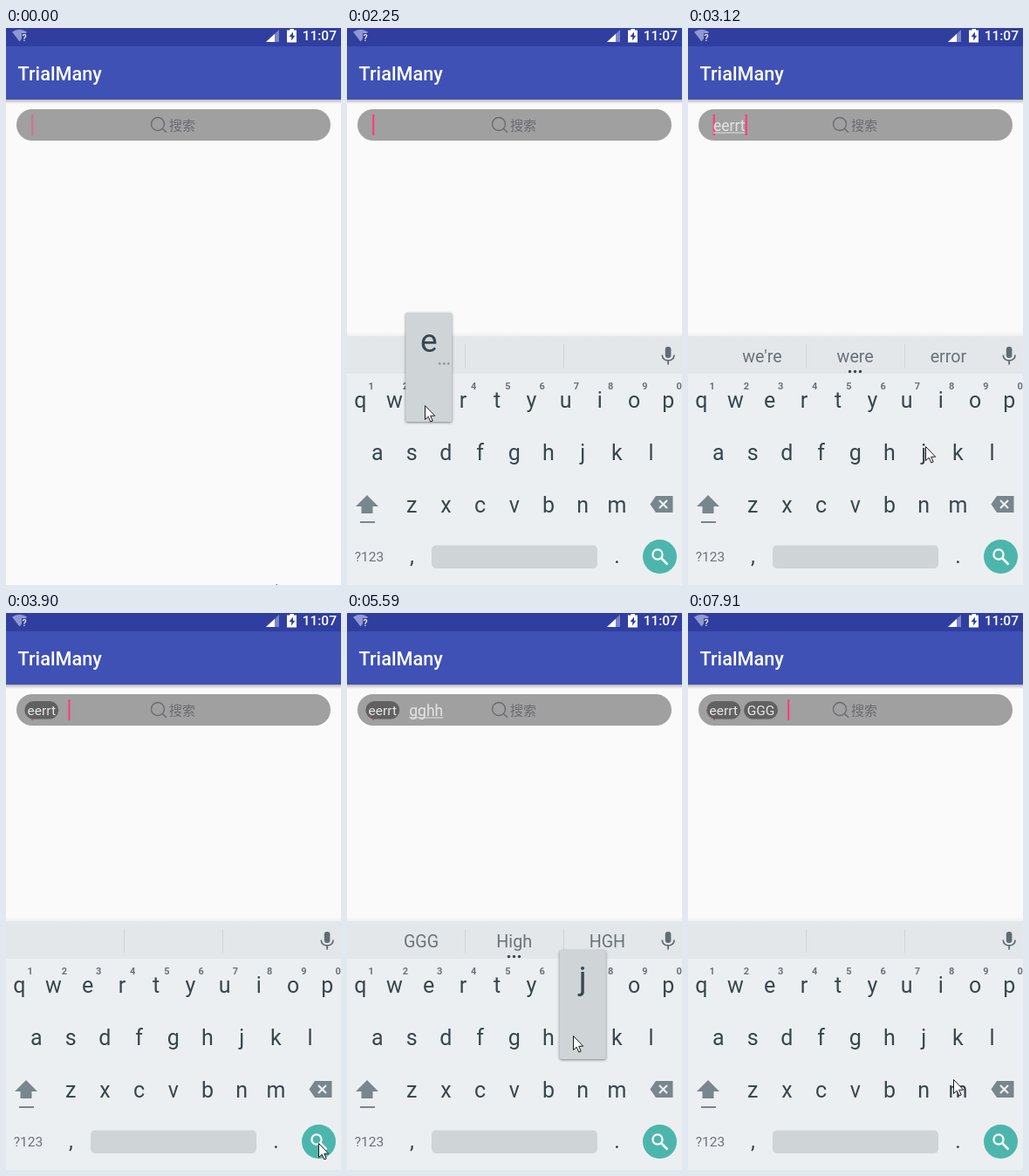
Recreate the animation shown at these times as an HTML page. Size 384 px wide and 638 px high, loop 7990 ms.

```html
<!DOCTYPE html>
<html>
<head>
<meta charset="utf-8">
<style>
html, body { margin: 0; width: 100%; height: 100%; overflow: hidden; background: #fafafa; }
svg { display: block; width: 100%; height: 100%; font-family: Roboto, "Noto Sans CJK SC", "Noto Sans CJK", sans-serif; }
.popup { filter: drop-shadow(0 1.5px 1.5px #0007); }
</style>
</head>
<body>
<svg id="stage" viewBox="0 0 384 638"></svg>
<script>
// The screen refreshes on even ticks; all times below are in ticks.
const LOOP = 7990, TICK_COUNT = 103, BLINK = 6.5;
const INK = '#37474f', SOFT = '#78868d', LABEL = '#69737a', KEY = '#cfd4d7', PINK = '#ff4081', HINT = '#6c6b72';
const FONT = 17.5;

const SEARCH = [358, 607];
// Pointer moves: start, end, destination
const MOVES = [
  [0, 7, [62, 108]], [19, 24, [83, 426]], [27, 29, [89, 432]],
  [32, 38, [170, 433]], [38, 40, [272, 479]], [40, 46, SEARCH],
  [55, 62, [196, 484]], [66, 72, [259, 484]], [73, 80, [79, 372]],
  [82, 86, [246, 372]], [88, 94, [370, 560]], [94, 98, SEARCH], [98, 102, [304, 534]]];
const TAPS = { 29: 'e', 31: 'e', 34: 'r', 36: 'r', 37: 't', 63: 'g', 65: 'g', 68: 'h', 70: 'h', 72: 'j' };
const OPEN = 10, FIRST_CHIP = 49, PICK = 81, SECOND_CHIP = 99;
const SUGGESTIONS = {
  e: ['we', 'eh', 'en'], ee: ['see', 'were', 'we'], eer: ['were', 'eerie', 'beer'],
  eerr: ['were', 'error', 'eerie'], eerrt: ["we're", 'were', 'error'],
  g: ['good', 'get', 'go'], gg: ['GG', 'egg', 'go'], ggh: ['GGG', 'High', 'ugh'],
  gghh: ['GGG', 'High', 'HGH'], gghhj: ['GGG', 'gghhj', 'Height'] };
const tapTicks = Object.keys(TAPS).map(Number);
// Moments that restart the caret's blinking
const WAKES = [-BLINK, 7, OPEN + 4, ...tapTicks.map(t => t + 1), FIRST_CHIP, PICK, SECOND_CHIP];

const ROWS = ['qwertyuiop', 'asdfghjkl', 'zxcvbnm'];
const keyX = (row, i) => 15.3 + (row / 2 + (row > 1 ? .5 : 0) + i) * 39.22;
const keyY = row => 434.5 + row * 60;

const pen = document.createElement('canvas').getContext('2d');
pen.font = `${FONT}px Roboto, sans-serif`;
const rect = (x, y, w, h, fill, r = 0, more = '') =>
  `<rect x="${x}" y="${y}" width="${w}" height="${h}" rx="${r}" fill="${fill}" ${more}/>`;
const path = (d, fill, more = '') => `<path d="${d}" fill="${fill}" ${more}/>`;
const line = (d, color, w) => path(d, 'none', `stroke="${color}" stroke-width="${w}"`);
const circle = (x, y, r, fill, more = '') => `<circle cx="${x}" cy="${y}" r="${r}" fill="${fill}" ${more}/>`;
const text = (s, x, y, size, fill, anchor = 'middle', weight = 400) =>
  `<text x="${x}" y="${y}" font-size="${size}" fill="${fill}" text-anchor="${anchor}" font-weight="${weight}">${s}</text>`;
const dots = (x, y, gap, r, fill) => [-1, 0, 1].map(i => circle(x + i * gap, y, r, fill)).join('');

const header =
  '<defs><linearGradient id="shade" x2="0" y2="1"><stop stop-color="#000" stop-opacity=".26"/>' +
  '<stop offset="1" stop-color="#000" stop-opacity="0"/></linearGradient></defs>' +
  rect(0, 0, 384, 638, '#fafafa') + rect(0, 82, 384, 5, 'url(#shade)') +
  rect(0, 0, 384, 82, '#3f51b5') + rect(0, 0, 384, 21, '#303f9f') +
  path('M7 4.5Q15.5 -1 24 4.5L15.5 15.5Z', '#8f98d0') +
  rect(18, 6, 7, 10, '#303f9f') + text('?', 21, 14.5, 10.5, '#fff', 'middle', 500) +
  path('M313 2V16H298Z', '#7a84c4') + path('M308 6.7V16H298Z', '#fff') +
  path('M325.5 1H330V2.5H333V16.5H322V2.5H325.5Z', '#fff') +
  path('M329 4.5L324.5 10H327.2V14.5L331.3 8.7H329Z', '#303f9f') +
  text('11:07', 379, 14, 15.5, '#fff', 'end', 500) +
  text('TrialMany', 13.5, 60, 21.7, '#fff', 'start', 500);

const field = rect(12, 93, 360, 36, '#a0a0a0', 18) +
  circle(174, 110, 7.5, 'none', `stroke="${HINT}" stroke-width="1.4"`) +
  line('M179.5 115.5L184 119.5', HINT, 1.6) + text('搜索', 187, 116.5, 15, HINT, 'start');

const letters = ROWS.map((row, r) => [...row].map((c, i) =>
  text(c, keyX(r, i), keyY(r), 25, INK) +
  (r ? '' : text((i + 1) % 10, keyX(r, i) + 12.3, 413.5, 11, LABEL, 'middle', 700))).join('')).join('');

const board =
  rect(0, 348, 384, 6, 'url(#shade)', 0, 'opacity=".2" transform="matrix(1 0 0 -1 0 702)"') +
  rect(0, 353, 384, 285, '#eceff1') + rect(0, 353, 384, 43, '#e3e7ea') +
  rect(135, 362, 1, 27, KEY) + rect(248, 362, 1, 27, KEY) +
  rect(364.8, 365, 6.6, 13, '#5f6c73', 3.3) +
  line('M361.3 374.5C361.3 383 375 383 375 374.5M368.1 381V385.5', '#5f6c73', 1.8) +
  letters +
  path('M23 535L36 548H29.5V556H16.5V548H10Z', SOFT) + rect(15, 565, 17, 2, SOFT) +
  path('M347.5 545.5L354 536H373.5V555H354Z', SOFT) +
  line('M358 541L367 550M367 541L358 550', '#eceff1', 2.2) +
  text('?123', 25.5, 611, 15.5, LABEL) + text(',', 74.5, 613, 25, INK) + text('.', 309.5, 613, 25, INK) +
  rect(97, 592.5, 190, 26.5, KEY, 5);

const searchKey = down => circle(358.5, 605.5, 19.5, down ? '#3f9c93' : '#4db6ac') +
  circle(356, 603, 5.6, 'none', 'stroke="#fff" stroke-width="2.2"') +
  line('M360 607L367.5 614.5', '#fff', 2.6);

function popup(c) {
  const row = ROWS.findIndex(r => r.includes(c));
  const x = keyX(row, ROWS[row].indexOf(c)), top = keyY(row) - 108.5;
  return rect(x - 26.5, top, 53, 125, KEY, 2, 'class="popup"') + text(c, x, top + 45, 37, INK) +
    (row ? '' : dots(x + 17.5, top + 58.5, 5, 1.4, '#929da2'));
}

function keyboard(n, words) {
  if (n <= OPEN) return '';
  const p = Math.min(1, (n - OPEN) / 4);
  return `<g opacity="${p}" transform="translate(0 ${(1 - p) ** 2 * 100})">` + board +
    (n === PICK - 1 ? rect(35, 354, 100, 42, '#d3d9dc') : '') +
    words.map((w, i) => text(w, 85 + i * 106.7, 383, 19.7, LABEL)).join('') +
    (words.length ? dots(191.5, 393.5, 6, 1.7, INK) : '') +
    searchKey(n === FIRST_CHIP - 1 || n === SECOND_CHIP - 1) + '</g>' +
    (TAPS[n] ? popup(TAPS[n]) : '');
}

function typedAt(n) {
  if (n >= SECOND_CHIP) return '';
  if (n >= PICK) return 'GGG';
  const from = n >= FIRST_CHIP ? FIRST_CHIP : 0;
  return tapTicks.filter(t => t >= from && t < n).map(t => TAPS[t]).join('');
}

function caretOpacity(n) {
  const phase = (n - WAKES.filter(w => w <= n).pop()) / BLINK;
  return phase % 2 < 1 ? 1 : phase % 2 === 1 ? .45 : 0;
}

function entry(n, typed, composing) {
  const chips = ['eerrt', 'GGG'].slice(0, (n >= FIRST_CHIP) + (n >= SECOND_CHIP));
  const caret = (x, o = 1) => rect(x, 99, 2.3, 24, PINK, 0, `opacity="${o}"`);
  let out = '', x = 29;
  if (n > 29) out += n < FIRST_CHIP ? caret(28.7) : rect(29, 121, 2, 2, '#d0506f');
  chips.forEach((word, i) => {
    const left = 21.3 + i * 42.7;
    out += rect(left, 101, 39, 20.5, '#616161', 10.2) + text(word, left + 19.5, 117, 15.5, '#e6e6e6');
    x = left + 50;
  });
  const w = pen.measureText(typed).width;
  return out + text(typed, x, 118, FONT, '#e4e4e4', 'start') +
    (composing ? rect(x, 119.5, w, 1, '#e4e4e4') : '') + caret(x + w, caretOpacity(n));
}

function pointer(n) {
  let [x, y] = [310, 637];
  for (const [start, end, [toX, toY]] of MOVES) {
    const k = Math.max(0, Math.min(1, (n - start) / (end - start)));
    x += (toX - x) * k;
    y += (toY - y) * k;
  }
  return path('M.5 .5V16.5L4.2 13.2L6.8 19L9.2 18L6.7 12.2H11.7Z', '#fff',
    `stroke="#1a1a1a" transform="translate(${x} ${y})"`);
}

function scene(n) {
  const typed = typedAt(n), words = SUGGESTIONS[typed] || [];
  return header + field + entry(n, typed, words.length) + keyboard(n, words) + pointer(n);
}

const stage = document.getElementById('stage');
let shown = -1;
function draw() {
  const n = Math.floor(performance.now() % LOOP / LOOP * TICK_COUNT + .1) % TICK_COUNT;
  if (n !== shown) stage.innerHTML = scene(shown = n);
  requestAnimationFrame(draw);
}
draw();
</script>
</body>
</html>
```
